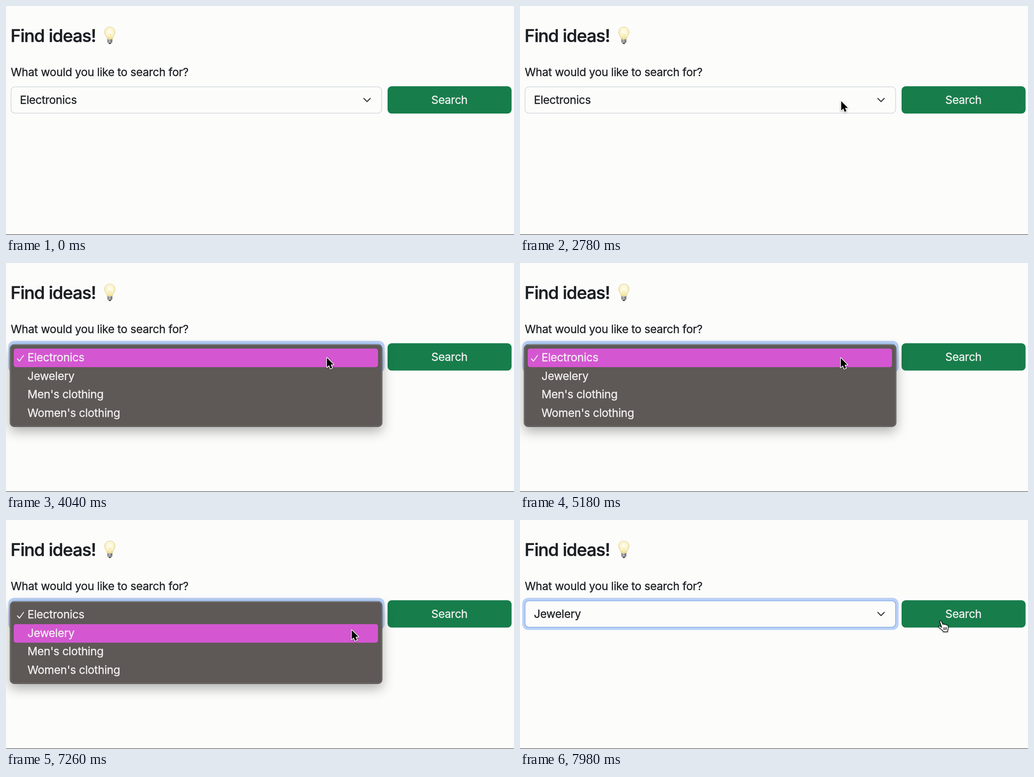
An HTML page that plays this animation: 1113x503 px, repeating every 8000 ms.

```html
<!DOCTYPE html>
<html lang="en">
<head>
<meta charset="utf-8">
<title>Find ideas</title>
<style>
  html, body { margin: 0; height: 100%; overflow: hidden; background: #fcfcfb; }
  svg { display: block; width: 1113px; height: 503px; }
  text {
    font: 24.5px Inter, "Liberation Sans", sans-serif;
    font-optical-sizing: none;
    letter-spacing: -.28px;
    fill: #1c1f23;
    stroke: #1c1f23;
    stroke-width: .35px;
  }
  .title { font-size: 38px; font-weight: 500; letter-spacing: -1px; stroke-width: .7px; }
  .light, #menu text { fill: #f4f2f2; stroke: #f4f2f2; }
  .shadow { filter: drop-shadow(0 10px 13px rgba(0, 0, 0, .3)); }
  #cursor { filter: drop-shadow(0 1.5px 1.5px rgba(0, 0, 0, .35)); }
</style>
</head>
<body>
<svg viewBox="0 0 1113 503">
  <defs>
    <radialGradient id="glass" cx=".5" cy=".4" r=".62">
      <stop offset="0" stop-color="#fffdf2"/>
      <stop offset=".6" stop-color="#fbf3cb"/>
      <stop offset="1" stop-color="#e8d686"/>
    </radialGradient>
    <linearGradient id="metal">
      <stop offset="0" stop-color="#77777a"/>
      <stop offset=".4" stop-color="#d0d0d0"/>
      <stop offset="1" stop-color="#66666a"/>
    </linearGradient>
  </defs>

  <text class="title" x="10" y="79">Find ideas!</text>
  <g id="bulb">
    <path d="M227.5 46C220.500 46 216 51 216 57.500C216 64 221 67 222 73.500H233C234 67 239 64 239 57.500C239 51 234.500 46 227.500 46Z"
      fill="url(#glass)" stroke="#dccb8c" stroke-width=".8"/>
    <path d="M226 73L225 63Q227.500 61 230 63L229 73" fill="none" stroke="#f0dc8e"/>
    <path d="M222 73H233V79L230 82.500H225L222 79Z" fill="url(#metal)"/>
    <path d="M222 76H233M222.500 79H232.500" stroke="#66666a" stroke-width=".8"/>
    <path d="M224.500 81H230.500L229 83.500H226Z" fill="#38383b"/>
  </g>
  <text x="10.5" y="154">What would you like to search for?</text>

  <rect id="ring" x="5" y="171" width="824.500" height="70.500" rx="13" fill="#bad1f7"/>
  <rect id="field" x="11" y="177.500" width="812" height="58" rx="8.500" fill="#fcfcfb" stroke-width="1.500"/>
  <text id="value" x="30.500" y="215"></text>
  <path d="M784 203l7 7 7-7" fill="none" stroke="#30363b" stroke-width="2.300" stroke-linecap="round" stroke-linejoin="round"/>

  <rect x="836" y="176.300" width="271.700" height="60" rx="9" fill="#177d4b"/>
  <text class="light" x="971.500" y="215" text-anchor="middle">Search</text>

  <g id="menu">
    <rect class="shadow" x="9" y="179.500" width="815" height="180" rx="8.500" fill="#5e5856" stroke="#2d2c2c"/>
    <rect x="10" y="180.500" width="813" height="178" rx="7.500" fill="none" stroke="#8b8684"/>
    <rect id="mark" x="17" width="798" height="40.700" rx="5" fill="#d457d1"/>
    <path d="M25 210.500l4.500 5L38.500 203" fill="none" stroke="#f4f2f2" stroke-width="2" stroke-linecap="round" stroke-linejoin="round"/>
  </g>

  <rect y="501.500" width="1113" height="1.500" fill="#757575"/>

  <g id="cursor">
    <path id="arrow" transform="translate(.8 1)" d="M0 0V20.500L4.600 16.300 7.600 23.700 11.500 22.100 8.500 14.800H14.700Z"
      stroke="#fff" stroke-width="3" stroke-linejoin="round" paint-order="stroke"/>
    <g id="hand" transform="translate(-5 -1)" fill="#fff" stroke="#111" stroke-width="1.400" stroke-linecap="round" stroke-linejoin="round">
      <path d="M4 4C3 1 6 0 7.500 3L10.500 9.500C11 8 13.500 8 14.300 10C15.500 8.500 17.500 9 18.200 11C19.500 10 21.500 11 22 13.500C23 17 22.500 19 21 22L20.800 25.500H11.500C10 21.500 5 19 1.500 15.500C0 13.500 2.500 12 4.500 13.500L8 16Z"/>
      <path d="M12.200 16.500l.6 5M15.200 16l.4 5M18.200 15.800l.2 5"/>
    </g>
  </g>
</svg>
<script>
const LOOP = 8000, OPEN = 2960, CLOSE = 7400, PICK = 7540;
const ROW_TOP = 188, ROW = 40.7;
const $ = id => document.getElementById(id);
const set = (id, attrs) => {
  for (const name in attrs) $(id).setAttribute(name, attrs[name]);
};
const clamp = v => Math.max(0, Math.min(1, v));

["Electronics", "Jewelery", "Men's clothing", "Women's clothing"].forEach((label, i) => {
  const item = document.createElementNS("http://www.w3.org/2000/svg", "text");
  item.setAttribute("x", 47);
  item.setAttribute("y", 216 + i * ROW);
  item.textContent = label;
  $("menu").append(item);
});

// Pointer tip: time, x, y
const path = [
  [940, 1120, 376], [1300, 985, 346], [1660, 880, 306], [2300, 703, 208],
  [5100, 702, 207], [6000, 700, 240], [6950, 700, 240],
  [7420, 777, 241], [7540, 777, 241], [7900, 921, 221]
];

function pointerAt(t) {
  const next = path.findIndex(p => p[0] > t);
  if (next === 0) return [1200, 400];
  if (next < 0) return path[path.length - 1].slice(1);
  const [t0, x0, y0] = path[next - 1], [t1, x1, y1] = path[next];
  let k = (t - t0) / (t1 - t0);
  if (t0 > 1300) k = t0 === 1660 ? 1 - (1 - k) ** 2 : k * k * (3 - 2 * k);
  return [x0 + (x1 - x0) * k, y0 + (y1 - y0) * k];
}

const withPauses = t => t < 840 ? t : t - Math.max(0, (t - 820) % 840 - 740);

function draw(now) {
  const t = withPauses(now % LOOP);
  const [x, y] = pointerAt(t);
  const focused = t >= OPEN, overButton = x > 836 && y < 236;
  const fade = t < CLOSE ? 1 : t < PICK ? 0.62 : clamp(0.3 - (t - PICK) / 200);

  set("ring", { opacity: clamp((t - OPEN) / 150) });
  set("field", { stroke: focused ? "#85abe3" : "#d2d6dd" });
  $("value").textContent = t < PICK ? "Electronics" : "Jewelery";
  set("menu", { opacity: focused ? fade : 0 });
  set("mark", { y: ROW_TOP + (t > 5100 && y > ROW_TOP + ROW || t >= PICK ? ROW : 0) });
  set("cursor", { transform: `translate(${x} ${y})` });
  set("arrow", { opacity: overButton ? 0 : 1 });
  set("hand", { opacity: overButton ? 1 : 0 });
  requestAnimationFrame(() => draw(performance.now()));
}
draw(0);
</script>
</body>
</html>
```
